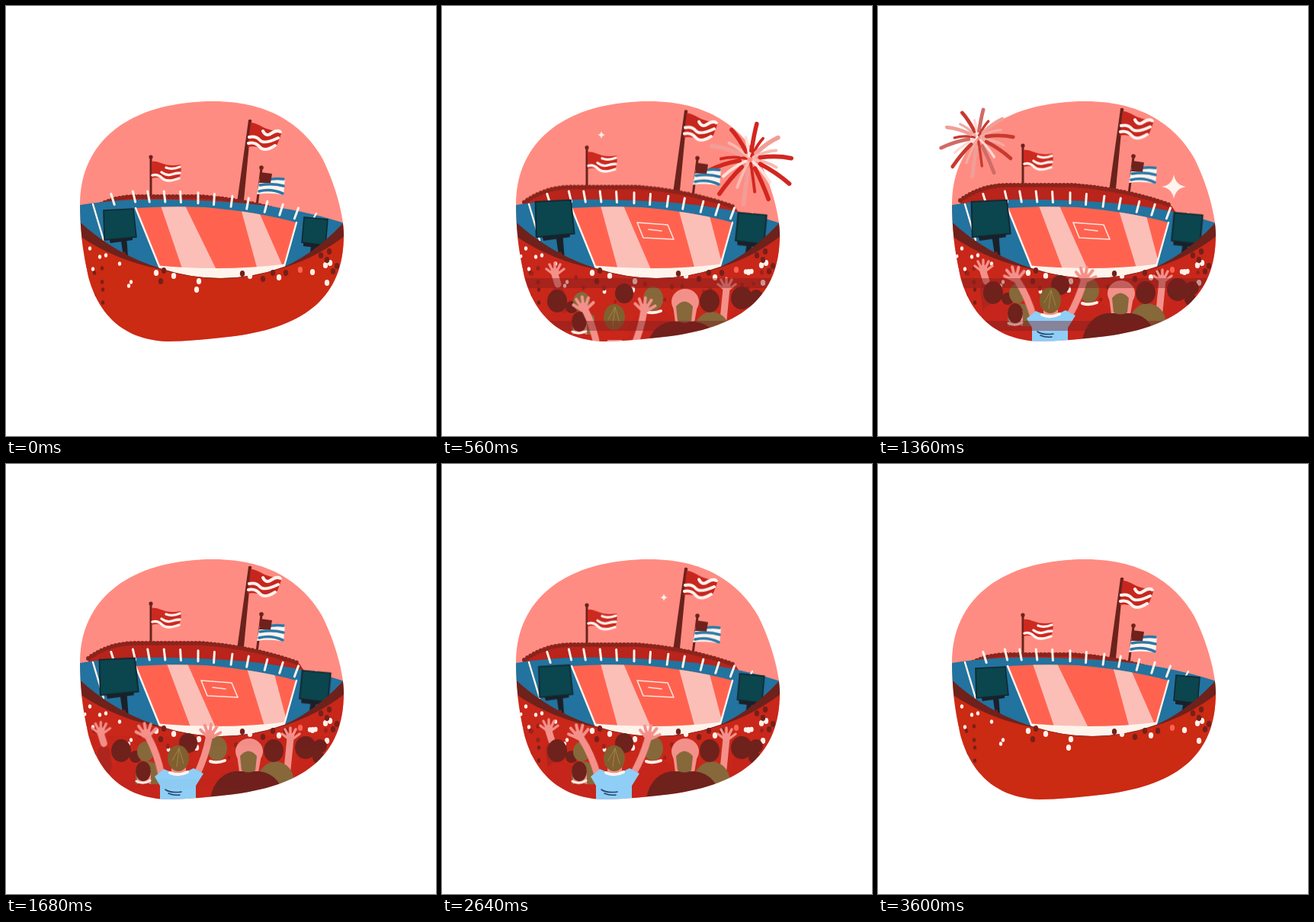
These frames come from a looping animation (564 by 564 pixels, 3680 ms). An HTML page:

```html
<!DOCTYPE html>
<html lang="en">
<head>
<meta charset="utf-8">
<title>Stadium</title>
<style>
html, body { margin: 0; width: 100%; height: 100%; overflow: hidden; background: #fff; }
svg { display: block; width: 100vw; height: 100vh; --loop: 3680ms; }
.line { fill: none; stroke-linecap: round; stroke-linejoin: round; }
.skin { stroke: #f4908a; stroke-width: 9; }
.maroon { fill: #6f211c; }
.olive { fill: #86683a; }
.pink { fill: #f4908a; }
.red { fill: #c5251b; }

.rise { animation: rise var(--loop) infinite; }
@keyframes rise {
  0%, 2% { transform: none; }
  15.2% { transform: translateY(-12.5px); }
  26%, 62% { transform: translateY(-15px); }
  71.7% { transform: translateY(-13px); }
  80.4% { transform: translateY(-6px); }
  90%, 100% { transform: none; }
}
.sway { animation: sway 920ms ease-in-out infinite alternate; }
@keyframes sway { to { transform: skewY(1.5deg); } }

.screen { animation: grow var(--loop) infinite; }
@keyframes grow {
  0%, 2% { transform: none; }
  15.2%, 57% { transform: scale(var(--size)); }
  71.7% { transform: scale(1.04); }
  82%, 100% { transform: none; }
}
.stripe1 { animation: stripe1 var(--loop) infinite; }
@keyframes stripe1 {
  0%, 2%, 97.8%, 100% { d: path("M203 262L235 262L278 350L233 350Z"); }
  15.2%, 71.7%, 80.4% { d: path("M208 262L238 262L276 350L232 350Z"); }
  37%, 54.3% { d: path("M211 262L238 262L277 350L244 350Z"); }
}
.stripe2 { animation: stripe2 var(--loop) infinite; }
@keyframes stripe2 {
  0%, 2%, 97.8%, 100% { d: path("M307 262L330 266L365 346L331 350Z"); }
  15.2%, 71.7%, 80.4% { d: path("M309 262L349 268L369 344L333 350Z"); }
  37%, 54.3% { d: path("M314 262L350 268L370 344L341 350Z"); }
}
.box { animation: box var(--loop) infinite; }
@keyframes box { 0%, 3%, 96%, 100% { opacity: 0; } 12%, 84% { opacity: 1; } }
.rail { animation: rail var(--loop) infinite; }
@keyframes rail { 0%, 8%, 48%, 100% { opacity: 0; } 15.2%, 38% { opacity: .42; } }
.front { animation: front var(--loop) infinite; }
@keyframes front { 0%, 2%, 92%, 100% { fill: #cb2a13; } 14%, 80% { fill: #c8271a; } }

.row { animation: row var(--loop) infinite; }
@keyframes row {
  0%, 3% { transform: translateY(100px); }
  15.2% { transform: translateY(11px); }
  22%, 71.7% { transform: none; }
  80.4% { transform: translateY(var(--dip)); }
  91%, 100% { transform: translateY(110px); }
}
.fan { animation: fan var(--loop) infinite; }
@keyframes fan {
  0%, 4% { transform: translateY(110px); }
  15.2% { transform: translateY(var(--low)); }
  26%, 80.4% { transform: none; }
  92%, 100% { transform: translateY(110px); }
}
.wave { animation: wave 640ms ease-in-out infinite alternate; }
@keyframes wave { from { transform: rotate(-2deg); } to { transform: rotate(5deg); } }
.reach { animation: reach var(--loop) infinite; }
@keyframes reach {
  0%, 3% { transform: translate(10px, 110px); }
  15.2% { transform: translate(8px, 2px); }
  37% { transform: translate(-2px, -2px); }
  54.3% { transform: translate(-19px, 5px); }
  71.7% { transform: none; }
  80.4% { transform: translate(-18px, 41px); }
  91%, 100% { transform: translate(-18px, 120px); }
}

.burst { opacity: 0; animation: fade var(--loop) var(--at) infinite; }
.burst path { stroke-dasharray: .78 3; animation: shoot var(--loop) var(--at) infinite; }
@keyframes fade { 0% { opacity: 0; } 1.5%, 8% { opacity: 1; } 13%, 100% { opacity: 0; } }
@keyframes shoot {
  0% { stroke-dashoffset: .72; }
  6.5% { stroke-dashoffset: var(--gap); }
  13%, 100% { stroke-dashoffset: -.95; }
}
.star { fill: #fff4ee; opacity: 0; animation: twinkle var(--loop) var(--at) infinite; }
@keyframes twinkle {
  0% { opacity: 0; scale: .3; }
  4.35% { opacity: 1; scale: 1; }
  8.7%, 100% { opacity: 0; scale: .3; }
}
</style>
</head>
<body>
<svg viewBox="0 0 564 564">
  <defs>
    <clipPath id="blob"><path d="M97 258C98 177 162 125 272 125C350 125 392 160 415 200C432 234 443 275 443 300C443 380 395 420 300 433C265 437 235 440 212 440C150 438 120 400 108 355C100 320 97 290 97 258Z"/></clipPath>
    <clipPath id="pitch"><path d="M170 265Q215 262 262 264Q330 270 381 284L365 342Q285 371 201 344Z"/></clipPath>
    <g id="hand">
      <circle r="5.5" fill="#f4908a"/>
      <path class="line" stroke="#f4908a" stroke-width="3.4" d="M-3 2L-11-4M-3-2L-7-10M0-2L0-12M3-2L7-10M4 2L12-4"/>
    </g>
  </defs>

  <g clip-path="url(#blob)"><path fill="#ff8c82" d="M90 120H450V450H90Z"/></g>
  <g id="sky"></g>

  <g clip-path="url(#blob)">
    <g class="rise">
      <path fill="#6b221c" d="M318 150L322 150L311 265L302 265Z"/>
      <path class="line" stroke="#6b221c" stroke-width="3" d="M190 199V265M335 213L328 270"/>
      <g class="maroon"><circle cx="190" cy="198" r="2.6"/><circle cx="335" cy="212" r="2.8"/><circle cx="320" cy="151" r="2.3"/></g>
      <g class="sway" style="transform-origin:190px 215px">
        <path fill="#cc2920" d="M191 204C202 202 206 212 229 208Q231 217 227 227C212 231 204 222 191 226Z"/>
        <path class="line" stroke="#fff3ee" stroke-width="3.3" d="M210 212q8 3 18-1M204 218q7 5 13 3t11-2M192 222q7-2 13 4t22 0"/>
      </g>
      <g class="sway" style="transform-origin:320px 170px">
        <path fill="#c6261e" d="M321 153C333 153 340 166 362 163Q360 173 354 185C342 191 332 182 317 185Z"/>
        <path class="line" stroke="#fff3ee" stroke-width="4" d="M337 164q4 8 11 3t12-2M319 172q9-2 14 4t24-3M318 180q9-2 15 5t20-2"/>
      </g>
      <g class="sway" style="transform-origin:333px 232px">
        <path fill="#fff3ee" d="M333 226Q349 224 366 226L364 248Q348 244 329 247Z"/>
        <path class="line" stroke="#2c78a6" stroke-width="3.6" d="M348 227q8-1 16 0M333 235q16-3 31 1M332 243q16-4 31 3"/>
        <path class="maroon" d="M334 218L349 220L347 232L332 232Z"/>
      </g>
      <path fill="#b9241b" d="M108 270Q135 250 170 250H255Q325 255 385 277L400 300H108Z"/>
      <path class="line" stroke="#8a241c" stroke-width="6" stroke-dasharray="0 5" d="M108 270Q135 250 170 250H255Q325 255 385 277"/>
    </g>

    <path fill="#22739f" d="M90 262C150 252 200 253 250 255C310 257 380 263 450 287V370H90Z"/>
    <g clip-path="url(#pitch)">
      <path fill="#ff6350" d="M160 255H390V370H160Z"/>
      <path class="stripe1" fill="#fbbfb8" d="M203 262L235 262L278 350L233 350Z"/>
      <path class="stripe2" fill="#fbbfb8" d="M307 262L330 266L365 346L331 350Z"/>
      <path fill="#fff4ec" d="M195 340Q285 349 370 338V370H195Z"/>
    </g>
    <path class="line" stroke="#fff4ee" stroke-width="2.4" d="M170 265L202 344M381 284L365 341M114 260L128 307M407 272L398 288"/>
    <path class="line box" stroke="#ffe3dc" stroke-width="1.6" d="M256 284L296 287L304 306L264 304ZM271 293L288 295"/>
    <g id="posts" class="line" stroke="#fff4ee" stroke-width="3"></g>

    <g class="screen" style="transform-origin:157px 327px;--size:1.19">
      <path fill="#1b2028" d="M150 302H158L160 329H154ZM135 305L166 302V307L137 311Z"/>
      <path fill="#0b454d" stroke="#13262e" stroke-width="1.5" d="M128 268L167 266L171 303L129 307Z"/>
    </g>
    <g class="screen" style="transform-origin:403px 328px;--size:1.2,1.12">
      <path fill="#1b2028" d="M401 308H407L404 330H398ZM390 310L417 313V318L390 315Z"/>
      <path fill="#0b454d" stroke="#13262e" stroke-width="1.5" d="M391 277L422 280L419 314L388 310Z"/>
    </g>

    <path class="maroon" d="M90 277Q140 325 202 344Q285 371 365 342Q410 322 450 276V450H90Z"/>
    <path class="front" fill="#cb2a13" d="M90 297Q140 333 202 345Q285 371 365 343Q412 328 450 297V450H90Z"/>
    <g id="dots"></g>
    <g id="extra" class="box"></g>

    <g class="row" style="--dip:4px">
      <path class="red" d="M377 450V400Q382 382 397 382Q420 376 436 392V450Z"/>
      <g class="maroon"><ellipse cx="393" cy="372" rx="14" ry="15"/><circle cx="412" cy="370" r="9"/><circle cx="410" cy="385" r="8"/></g>
    </g>
    <g class="row" style="--dip:6px">
      <ellipse class="maroon" cx="239" cy="366" rx="12" ry="13"/>
      <path class="red" d="M244 450V412Q252 388 277 388Q305 388 310 412V450Z"/>
      <ellipse class="olive" cx="277" cy="373" rx="13" ry="16"/>
      <path class="line" stroke="#fff0e8" stroke-width="4" d="M268 390Q277 393 287 389"/>
    </g>
    <g class="row" style="--dip:31px">
      <path class="line skin" d="M373 360L369 400"/><use href="#hand" x="373" y="358"/>
    </g>
    <g class="row" style="--dip:18px">
      <path class="olive" d="M328 450V412Q338 390 354 390Q372 392 377 410V450Z"/>
      <ellipse class="maroon" cx="351" cy="376" rx="13" ry="15"/>
    </g>
    <g class="row" style="--dip:10px">
      <ellipse class="pink" cx="319" cy="377" rx="18" ry="17"/><path class="pink" d="M303 382H335L331 404H306Z"/>
    </g>
    <g class="row" style="--dip:23px">
      <path class="maroon" d="M266 450Q270 408 300 403H332Q362 406 370 450Z"/>
      <path class="olive" d="M307 383Q318 370 329 383L327 402Q318 407 309 402Z"/>
    </g>

    <g class="reach">
      <path class="line" stroke="#ad251e" stroke-width="16" d="M144 374L150 420"/>
      <path class="line skin" d="M140 350L144 363"/><use href="#hand" x="140" y="347"/>
    </g>
    <g class="row" style="--dip:24px">
      <path class="red" d="M128 450L138 398Q152 382 172 398L196 450Z"/>
      <ellipse class="maroon" cx="151" cy="376" rx="13" ry="15"/><circle class="maroon" cx="170" cy="384" r="8"/>
      <ellipse class="olive" cx="183" cy="377" rx="11" ry="13"/><path class="olive" d="M170 400Q183 382 200 396V420H170Z"/>
      <path class="pink" d="M172 400H190V420H172Z"/>
      <path class="red" d="M152 450Q160 420 180 417Q204 420 206 450Z"/>
      <path class="line" stroke="#fff0e8" stroke-width="3" d="M171 416Q180 421 189 415"/>
      <ellipse class="maroon" cx="180" cy="403" rx="10" ry="13"/>
    </g>

    <g class="fan" style="--low:42px">
      <g class="wave" style="transform-origin:204px 408px"><path class="line skin" d="M204 408Q197 380 184 359"/><use href="#hand" transform="translate(181 355) rotate(-12) scale(1.15)"/></g>
      <g class="wave" style="transform-origin:251px 406px;animation-direction:alternate-reverse"><path class="line skin" d="M251 406Q262 382 266 360"/><use href="#hand" transform="translate(267 355) rotate(8) scale(1.15)"/></g>
      <path fill="#8fcef6" d="M195 410L207 400Q226 410 246 399L259 406L249 422V460H202V422Z"/>
      <path class="pink" d="M217 396H236V406Q226 412 217 406Z"/>
      <path class="line" stroke="#fff6f0" stroke-width="4" d="M215 405Q226 410 238 404"/>
      <path class="line" stroke="#24436a" stroke-width="1.6" d="M209 427Q216 432 230 430M213 432Q220 435 228 434"/>
    </g>
    <g class="fan" style="--low:22px">
      <ellipse fill="#80602f" cx="226" cy="386" rx="14" ry="17"/>
      <path class="line" stroke="#a1834c" stroke-width="1" d="M227 373L224 397M227 373L218 389M227 373L233 393"/>
    </g>
    <path class="rail" fill="#7c1e1e" d="M90 357H450V370H90ZM90 413H450V426H90Z"/>
  </g>
</svg>
<script>
const $ = id => document.getElementById(id);
function add(parent, tag, attrs) {
  const el = document.createElementNS("http://www.w3.org/2000/svg", tag);
  for (const k in attrs) el.setAttribute(k, attrs[k]);
  return parent.appendChild(el);
}
let seed = 7;
const rnd = () => (seed = seed * 16807 % 2147483647) / 2147483647;

// Long rays start away from the centre, short ones close to it; all sag a little.
function burst(x, y, r, at, colors, width) {
  const g = add($("sky"), "g", { class: "burst line", transform: `translate(${x} ${y})`, style: `--at:${at}ms` });
  const n = 20;
  for (let i = 0; i < n; i++) {
    const a = (i + .5) / n * Math.PI * 2;
    const long = i % 2;
    const len = r * (long ? .95 + rnd() * .12 : .7 + rnd() * .12);
    const ex = Math.cos(a) * len * .94, ey = Math.sin(a) * len * .9 + r * .12;
    add(g, "path", {
      d: `M0 0Q${ex * .55} ${ey * .55 - r * .1} ${ex} ${ey}`, pathLength: 1,
      stroke: colors[i % colors.length], "stroke-width": long ? width : width * .7,
      style: `--gap:${long ? -.24 : -.12}`
    });
  }
}
burst(404, 201, 58, 320, ["#f9b9b2", "#d2271f", "#ffe0da", "#d2271f", "#d2271f", "#f29d96"], 5.6);
burst(131, 173, 49, 1120, ["#f3aaa3", "#c9392f", "#ffd9d3", "#cf6c66", "#c9392f", "#ef9f98"], 4.8);
burst(277, 218, 23, 1800, ["#fff0ea", "#ffd5ce"], 2.4);

function star(x, y, r, at) {
  const q = r * .14;
  const g = add($("sky"), "g", { transform: `translate(${x} ${y})` });
  add(g, "path", {
    class: "star", style: `--at:${at - 160}ms`,
    d: `M0 ${-r}Q${q} ${-q} ${r} 0Q${q} ${q} 0 ${r}Q${-q} ${q} ${-r} 0Q${-q} ${-q} 0 ${-r}Z`
  });
}
star(209, 169, 5, 560);
star(388, 237, 16, 1360);
star(258, 153, 5, 2000);
star(253, 181, 4, 2000);
star(291, 175, 5, 2640);
star(308, 154, 4, 2960);

const posts = [140, 168, 187, 208, 229, 252, 273, 296, 317, 341, 361, 381];
for (const x of posts) {
  const y = 250 + Math.max(0, x - 200) ** 2 / 1500 + Math.max(0, 168 - x) / 8;
  const lean = (250 - x) / 50;
  add($("posts"), "path", { d: `M${x - lean} ${y - 7}L${x + lean} ${y + 7}` });
}

const dot = (parent, x, y, fill, r) =>
  add(parent, "ellipse", { cx: x, cy: y, rx: r * .9, ry: r * 1.15, fill });
const pairs = s => s.split(" ").map(p => p.split(",").map(Number));
const size = x => x < 170 ? 2.4 : 3.5;
for (const [x, y] of pairs("110,318 104,346 114,345 123,329 131,327 149,338 161,367 164,362 197,350 220,354 253,361 250,372 320,354 358,356 402,349 421,363 425,337 419,340"))
  dot($("dots"), x, y, "#fff1ea", size(x));
for (const [x, y] of pairs("126,344 116,350 126,362 127,372 116,381 127,389 155,325 207,347 203,361 310,351 350,350 337,358 367,350 413,327 421,333 429,348 434,341 424,322"))
  dot($("dots"), x, y, "#75201a", size(x));
dot($("dots"), 386, 346, "#ff6350", 3.5);

for (let i = 0; i < 26; i++) {
  const x = 100 + rnd() * 340;
  const edge = 360 - ((x - 280) / 180) ** 2 * 46;
  dot($("extra"), x, edge + 5 + rnd() * 30, i % 7 ? "#9c221b" : "#fff1ea", 2 + rnd());
}
</script>
</body>
</html>
```
